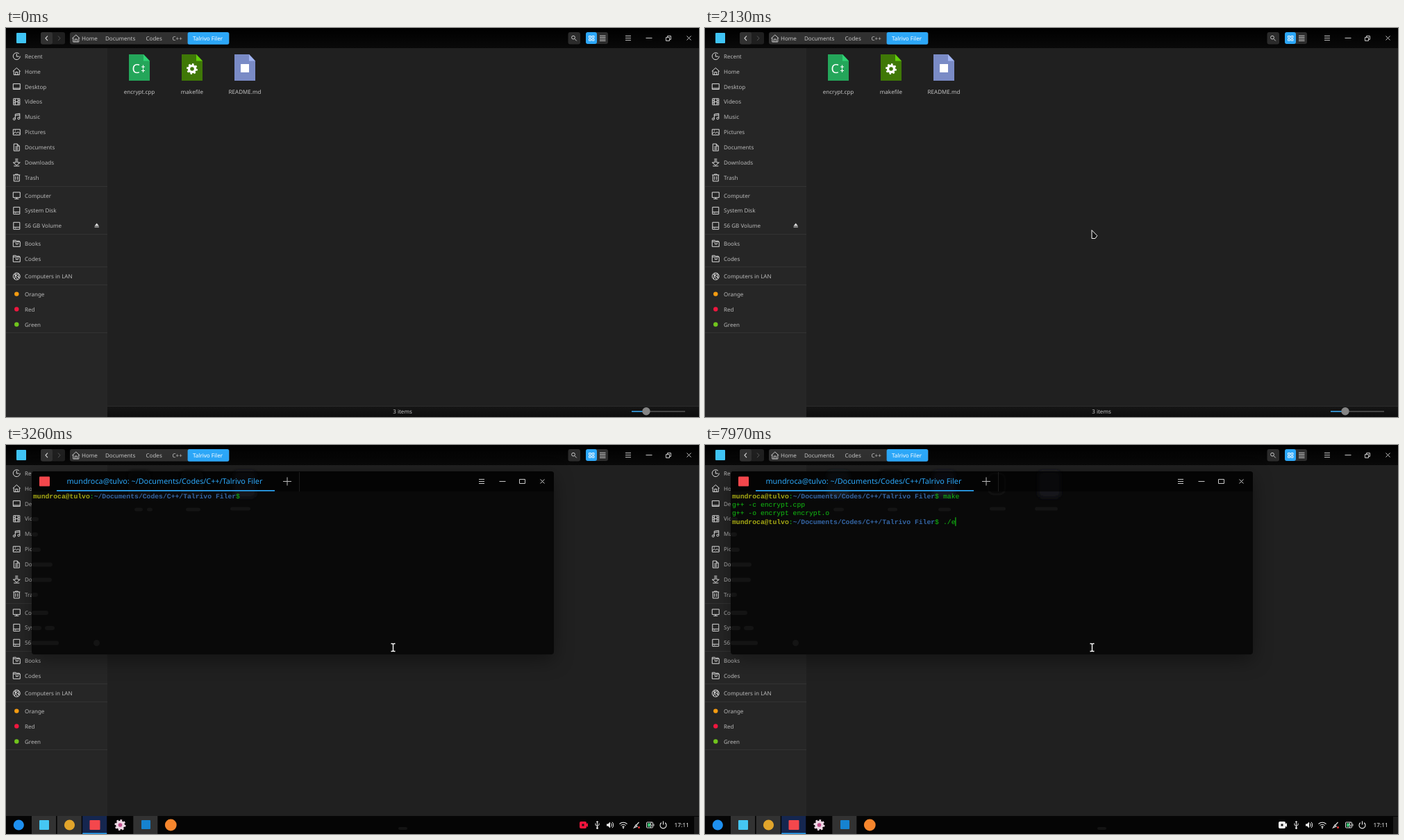
These frames come from a looping animation (998 by 561 pixels, 8 s). An HTML page:

```html
<!DOCTYPE html>
<html lang="en">
<head>
<meta charset="utf-8">
<title>Terminal build</title>
<style>
  html, body { margin: 0; width: 100%; height: 100%; overflow: hidden; background: #202020; }
  svg { display: block; width: 998px; height: 561px; }
  text { font: 8.04px "Noto Sans", "Open Sans", sans-serif; fill: #c3c3c3; text-rendering: geometricPrecision; white-space: pre; }
  .mono text { font: 9.742px "Liberation Mono", monospace; fill: #12c012; }
  .mono .user { font-weight: bold; fill: #a6a914; }
  .mono .path { font-weight: bold; fill: #3465a4; }
  .line { fill: none; stroke: #c8c8c8; stroke-width: 1; }
  .mid { text-anchor: middle; }
  #term .frame { filter: drop-shadow(0 8px 14px rgba(0, 0, 0, .4)); }
</style>
</head>
<body>
<svg id="stage" viewBox="0 0 998 561"></svg>
<script>
const LOOP = 8000, BLUE = '#2ca7f8', CELL = 5.846, LINE = 12.42;
const USER = 'mundroca@tulvo', PROJECT = 'Talrivo Filer';
const DIR = '~/Documents/Codes/C++/' + PROJECT;

const rect = (x, y, w, h, fill, r = 0, more = '') =>
  `<rect x="${x}" y="${y}" width="${w}" height="${h}" rx="${r}" fill="${fill}" ${more}/>`;
const dot = (x, y, r, fill) => `<circle cx="${x}" cy="${y}" r="${r}" fill="${fill}"/>`;
const line = (d, color = '#c8c8c8', w = 1) => `<path class="line" d="${d}" style="stroke:${color};stroke-width:${w}"/>`;
const label = (x, y, s, more = '') => `<text x="${x}" y="${y + 2.9}" ${more}>${s}</text>`;
const at = (x, y, s) => `<g transform="translate(${x} ${y})">${s}</g>`;
const group = (id, s, more = '') => `<g id="${id}" ${more}>${s}</g>`;
const gear = (x, y, r, fill, hole) => dot(x, y, r, fill) +
  `<circle cx="${x}" cy="${y}" r="${r}" fill="none" stroke="${fill}" stroke-width="${r * .55}" pathLength="16" stroke-dasharray="1"/>` +
  dot(x, y, r * .45, hole);

const windowButtons = (x, y, full) => at(x, y,
  line('M-3.500-3h8M-3.500 0h8M-3.500 3h8') + line('M26 0h9') +
  line(full ? 'M55-1h5v5h-5zM57-1v-2h5v5h-2' : 'M55-3h8v6h-8z') + line('M85-3l6 6m0-6l-6 6'));

// Sidebar symbols, centred on the origin
const drive = 'M-4.500-5h9v10h-9zM-4.500 2h9M-2 3.500h1';
const folder = 'M-5-2.500h10v7h-10zM-5-2.500v-2h4l1 1h4v1M-1-1v2h3v-2';
const home = 'M-5.500 0L0-5l5.500 5M-4-1v6h8v-6M-1.500 5v-4h3v4';
const symbols = {
  Recent: 'M5 0A5 5 0 1 1 3.500-3.500M0-3.500v4h3.500',
  Home: home,
  Desktop: 'M-5-4h10v8h-10zM-5 2.500h10',
  Videos: 'M-4.500-4.500h9v9h-9zM-2-4.500v9M2-4.500v9M-4.500-1.500h2.500m4 0h2.500M-4.500 1.500h2.500m4 0h2.500M-2 0h4',
  Music: 'M-2 3v-7l6.500-1v7M-2-2l6.500-1M-2 3a1.500 1.500 0 1 1-3 0a1.500 1.500 0 1 1 3 0M4.500 2a1.500 1.500 0 1 1-3 0a1.500 1.500 0 1 1 3 0',
  Pictures: 'M-5-4h10v8h-10zM-5 2.500l3-3l2 2l2-2l3 3M-2.500-2.500h1',
  Documents: 'M-4-5h5l3 3v7h-8zM1-5v3h3M-2-1h4M-2 1h4M-2 3h4',
  Downloads: 'M-2-5h4M-2-3h4M-2-1v1h-3l5 4l5-4h-3v-1zM-4 5h8',
  Trash: 'M-5-4h10M-2-4v-1h4v1M-4-4v9h8v-9M-1.500-2v5M1.500-2v5',
  Computer: 'M-5-4.500h10v7.500h-10zM-3 5h6M0 3v2',
  'System Disk': drive, '56 GB Volume': drive, Books: folder, Codes: folder,
  'Computers in LAN': 'M5 0A5 5 0 1 1-5 0A5 5 0 1 1 5 0M-4-3l8 5M-3 4l2-9M-2-1l5-3M-2 0l4 5M3-3v6'
};
const tags = { Orange: '#f79c11', Red: '#f0173f', Green: '#71c51d' };
const breaks = { Trash: 1, '56 GB Volume': 1, Codes: 1, 'Computers in LAN': 1, Green: 1 };

function sidebar() {
  let y = 40.8, out = rect(0, 29, 146, 532, '#262626');
  for (const name of [...Object.keys(symbols), ...Object.keys(tags)]) {
    out += tags[name] ? dot(15.3, y - .2, 3.2, tags[name]) : at(15.3, y - .2, line(symbols[name], '#dcdcdc'));
    out += label(27, y, name, 'style="fill:#b9b9b9"');
    if (breaks[name]) { out += rect(0, Math.round(y + 11.4), 146, 1, '#333'); y += 3.55; }
    y += 21.92;
  }
  return out + `<path d="M127.500 285.500l3.200-4l3.200 4zM127.500 286.500h6.400v1h-6.400z" fill="#ddd"/>`;
}

const file = (x, name, fill, fold, mark) =>
  `<path d="M${x - 15} 38h21l9 9.500v28.500h-30z" fill="${fill}"/><path d="M${x + 6} 38v9.500h9z" fill="${fold}"/>` +
  mark + label(x, 92, name, 'class="mid"');

function fileManager() {
  const crumbs = [[109, 'Home'], [143, 'Documents'], [201.5, 'Codes'], [239.5, 'C++']];
  return rect(0, 0, 998, 561, '#202020') + sidebar() +
    rect(0, 0, 998, 29, 'url(#bar)') +
    rect(15, 7, 14, 15, '#3fc4f5', 1) +
    rect(50, 6, 35, 17.500, '#1f1f1f', 3) + rect(50, 6, 17, 17.500, '#313131', 3) +
    line('M60 11.500l-3 3.300l3 3.300', '#ddd', 1.1) + line('M75 11.500l3 3.300l-3 3.300', '#555') +
    rect(92, 6, 230, 17.500, '#303030', 3) + rect(261.6, 6, 59.500, 17.800, BLUE, 2.5) +
    at(100.8, 15, line(home)) + crumbs.map(([x, s]) => label(x, 15, s)).join('') +
    label(269, 15, PROJECT, 'style="fill:#fff"') +
    rect(809.5, 6, 17.500, 17.500, '#2b2b2b', 3) +
    `<circle class="line" cx="817" cy="13.700" r="2.400"/>` + line('M818.800 15.500l3 3') +
    rect(835, 6, 32, 17, '#2d2d2d', 3) + rect(835, 6, 16, 17, BLUE, 3) +
    line('M839.500 11.500h3v2.500h-3zM844 11.500h3v2.500h-3zM839.500 15.700h3v2.500h-3zM844 15.700h3v2.500h-3z', '#fff', .9) +
    line('M855 11.200h8.500M855 13.600h8.500M855 16h8.500M855 18.400h8.500') + windowButtons(895.5, 14.5, true) +
    file(192, 'encrypt.cpp', '#24a65a', '#2fd475',
      `<text x="181.500" y="65" style="font-size:18px;fill:#fff">C</text>` + line('M195 56h5M197.500 53.500v5M195 61.500h5M197.500 59v5', '#fff', 1.1)) +
    file(268, 'makefile', '#3f7807', '#62cf0b', gear(268, 59, 6.2, '#fff', '#3f7807')) +
    file(344, 'README.md', '#7a8bc6', '#a2b5f2', rect(338, 52, 12, 12, '#fff')) +
    rect(146, 545, 852, 16, 'url(#status)') + rect(146, 545, 852, 1, '#2b2b2b') +
    label(571, 553, '3 items', 'class="mid"') +
    rect(901, 552.3, 77, 1.4, '#5a5a5a') + rect(901, 552.3, 18, 1.4, BLUE) + dot(922, 552.8, 5.7, '#858585');
}

const menuItems = [[207.5, 'New folder'], [223.5, 'New document', 1], [243, 'Display as', 1], [259, 'Sort by', 1],
  [275, 'Open in new window as admin'], [291, 'Open in terminal'], [311, 'Paste'], [327, 'Select all'], [347, 'Properties']];
const menu = () => rect(496, 196, 157, 161, '#a9abaa', 4) +
  [233.3, 300.8, 336.8].map(y => rect(498, y, 153, 1, '#949696')).join('') +
  rect(496, 235, 157, 16, BLUE, 0, 'id="hover"') +
  menuItems.map(([y, s, sub]) => `<g class="item" fill="${s == 'Paste' ? '#717373' : '#252727'}">` +
    label(516, y, s, 'style="fill:inherit"') +
    (sub ? `<path d="M645 ${y - 3}l3 3l-3 3" fill="none" stroke="#333"/>` : '') + '</g>').join('');

const blob = (x, y, w, h = 6, fill = '#141414') => rect(x, y - h / 2, w, h, fill, Math.min(w, h) / 2);
const haze = (x, fill) => rect(x - 16, 38, 32, 38, fill, 6, 'filter="url(#soft)"');
const row = i => 76.6 + i * LINE;
const prompt = i => `<text x="39" y="${row(i)}"><tspan class="user">${USER}</tspan>:<tspan class="path">${DIR}</tspan>$</text>`;
const typed = i => `<text id="typed${i}" x="${39 + 52 * CELL}" y="${row(i)}"></text>`;

function terminal() {
  const sideBlobs = [[107, 10], [129, 9], [151, 13], [172.5, 30], [194.5, 29], [216, 9], [242, 24], [264, 14], [285.5, 39]];
  return rect(37, 38, 752, 264, '#090909', 4, 'class="frame"') +
    sideBlobs.map(([y, w]) => blob(37, y, w)).join('') + blob(56, 264, 14) + blob(126, 285.5, 9, 9) +
    group('before', haze(192, '#0b0e0c') + haze(268, '#0b0d09') + haze(344, '#12151d') +
      blob(185, 93, 12, 5) + blob(203, 93, 8, 5) + blob(259, 93, 21, 5) + blob(323, 92, 29, 5)) +
    group('after', haze(192, '#141a22') + haze(268, '#070707') + haze(344, '#131820') + haze(496, '#12141c') +
      `<rect x="408" y="41" width="24" height="30" rx="8" fill="none" stroke="#111" stroke-width="3"/>` +
      blob(185, 93, 15, 5) + blob(263, 93, 14, 5) + blob(336, 93, 18, 5) + blob(410, 92, 23, 5) + blob(475, 92, 33, 5)) +
    `<path d="M37 67v-25q0-4 4-4h744q4 0 4 4v25z" fill="#000" opacity=".6"/>` +
    rect(48, 45.5, 15, 14, '#f4474c', 1) +
    `<text x="87.500" y="56.200" style="font-size:10.820px;fill:${BLUE}">${USER}: ${DIR}</text>` +
    rect(73, 65, 314, 1.7, BLUE) + rect(422, 39, 1, 28, '#1c1c1c') +
    line('M399 52.500h12M405 46.500v12', '#bbb') + windowButtons(684.5, 52.5) +
    `<g class="mono">` + prompt(0) + typed(0) +
    `<text id="out1" x="39" y="${row(1)}">g++ -c encrypt.cpp</text>` +
    `<text id="out2" x="39" y="${row(2)}">g++ -o encrypt encrypt.o</text>` +
    group('prompt3', prompt(3)) + typed(3) + '</g>' +
    rect(0, 0, 1.1, 12.6, '#14c814', 0, 'id="caret"');
}

function dock() {
  const tile = (x, fill) => rect(x, 535, 35, 26, fill);
  return rect(0, 535, 998, 26, '#050505') + blob(565, 553, 13, 4, '#131313') +
    tile(37, '#323232') + tile(73.7, '#323232') + tile(110.2, '#15264f') + rect(110.2, 559.5, 35, 1.5, BLUE) + tile(183.3, '#323232') +
    dot(18.3, 548, 7.6, '#1e90f0') + rect(48, 541, 14, 14, '#45c6f2', 1) + dot(91.5, 548, 7.6, '#e2a52b') +
    rect(120.5, 541, 15, 14, '#f4474c', 1) + gear(164.5, 548, 6.3, '#eed9e6', '#c0508c') +
    rect(195, 541, 13, 13, '#1683d0', 1) + dot(237.3, 548, 8.4, '#f7862d') +
    group('record', `<path d="M828 543h6q2 0 2 2v1.500l2-1.500v6l-2-1.500v1.500q0 2-2 2h-6q-2 0-2-2v-6q0-2 2-2z"/>` + dot(831, 548, 1.7, '#111')) +
    line('M851.500 553v-10M849 545.500v2.500l2.500 2l2.500-2v-2.500M850 544l1.500-1.500l1.500 1.500', '#eee') + dot(851.5, 552.5, 1.4, '#eee') +
    `<path d="M865 546.500h2l3-3v9l-3-3h-2z" fill="#eee"/>` + line('M871.500 545.500q2 2.500 0 5M873 543.800q3.500 4.200 0 8.400', '#eee') +
    line('M883.500 546.500q5.500-4.500 11 0M885.500 548.700q3.500-3 7 0M887.500 550.700q1.500-1.200 3 0', '#eee', 1.1) + dot(889, 552.3, 1, '#eee') +
    line('M904.500 552l2.500-4l2 2zM907.500 548.500l4-4.500', '#ddd', 1.2) + dot(911.5, 551.5, 1.5, '#e33') +
    rect(922.5, 544, 9, 8, 'none', 1, 'stroke="#ddd"') + rect(924, 545.5, 4, 5, '#38c172') + line('M933 546.500v3M929.500 544l-2 4h2.500l-2 4', '#ddd') +
    line('M943.800 544.800a4.500 4.500 0 1 0 5.400 0M946.500 542.500v5', '#eee', 1.1) +
    label(962.5, 548.3, '17:11', 'style="fill:#eee;font-size:8.300px"') + rect(991, 536, 7, 25, '#1c1c1c');
}

const beam = 'M554.500 286.500h2l1 1l1-1h2M557.500 287v10M554.500 297.500h2l1-1l1 1h2';
stage.innerHTML = `<defs>
  <linearGradient id="bar" x2="0" y2="1"><stop stop-color="#000"/><stop offset="1" stop-color="#090909"/></linearGradient>
  <linearGradient id="status" x2="0" y2="1"><stop stop-color="#161616"/><stop offset="1" stop-color="#0d0d0d"/></linearGradient>
  <filter id="soft"><feGaussianBlur stdDeviation="3"/></filter></defs>` +
  fileManager() + group('menu', menu()) + group('term', terminal()) + group('dock', dock()) +
  group('arrow', `<path d="M.5.500v12h5l2.800-4z" fill="#111" stroke="#fff"/>`) +
  group('ibeam', line(beam, '#000', 2.6) + line(beam, '#fff', 1.4));

const el = id => document.getElementById(id);
const show = (id, on) => el(id).style.display = on ? '' : 'none';
const ramp = (t, a, b) => Math.min(1, Math.max(0, (t - a) / (b - a)));
const latest = (steps, t) => steps.filter(s => s[0] <= t).pop();

// time, hovered menu entry
const hovers = [[0, -1], [710, 0], [810, 1], [860, 2], [960, 3], [1010, 4], [1060, 5], [1520, -1]];
// time, terminal row, typed text, caret visible
const typing = [[0, 0, '', 1], [2690, 0, '', 0], [3310, 0, '', 1], [3390, 0, 'm', 1], [3930, 0, 'ma', 1], [4160, 0, 'mak', 1],
  [4270, 0, 'make', 1], [4490, 2, '', 1], [4890, 3, '', 0], [5000, 3, '', 1], [5670, 3, '', 0], [6020, 3, '/', 1], [6580, 3, '/', 0],
  [6630, 3, '', 1], [6920, 3, '.', 1], [7030, 3, './', 1], [7600, 3, './', 0], [7920, 3, './', 1], [7970, 3, './e', 1]];
const blinks = [[0, 0], [3260, 1], [4040, 0], [4840, 1], [5620, 0], [6400, 1], [7180, 0]];
const items = [...document.querySelectorAll('.item')];
const itemFills = items.map(g => g.getAttribute('fill'));

function render(t) {
  const opacity = ramp(t, 560, 710) * (1 - ramp(t, 1870, 2120));
  show('menu', opacity > 0);
  el('menu').style.opacity = opacity;
  const hover = latest(hovers, t)[1];
  show('hover', hover >= 0);
  if (hover >= 0) el('hover').setAttribute('y', menuItems[hover][0] - 8);
  items.forEach((g, i) => {
    g.setAttribute('fill', i == hover ? '#fff' : itemFills[i]);
    if (g.children[1]) g.children[1].setAttribute('stroke', i == hover ? '#fff' : '#333');
  });

  const opened = t >= 2180;
  show('term', opened);
  show('ibeam', opened);
  const pressing = t >= 560 && t < 610;
  show('arrow', pressing || t >= 2030 && !opened);
  el('arrow').setAttribute('transform', pressing ? 'translate(486 186)' : 'translate(556.500 291)');

  const slide = 27 * (1 - ramp(t, 2190, 2480)) ** 3;
  show('dock', opened && slide < 26.5);
  el('dock').setAttribute('transform', `translate(0 ${slide})`);
  el('record').setAttribute('fill', latest(blinks, t)[1] ? '#f0143c' : '#f2f2f2');

  const [, at, text, caret] = latest(typing, t);
  el('typed0').textContent = at ? 'make' : text;
  el('typed3').textContent = at == 3 ? text : '';
  show('out1', t >= 4490);
  show('out2', t >= 4890);
  show('prompt3', t >= 5000);
  show('before', t < 5050);
  show('after', t >= 5050);
  show('caret', caret);
  const column = at == 2 ? 0 : 52 + text.length;
  el('caret').setAttribute('transform', `translate(${39 + column * CELL - .2} ${67 + at * LINE})`);
}

function tick(now) {
  render(now % LOOP);
  requestAnimationFrame(tick);
}
render(0);
requestAnimationFrame(tick);
</script>
</body>
</html>
```
